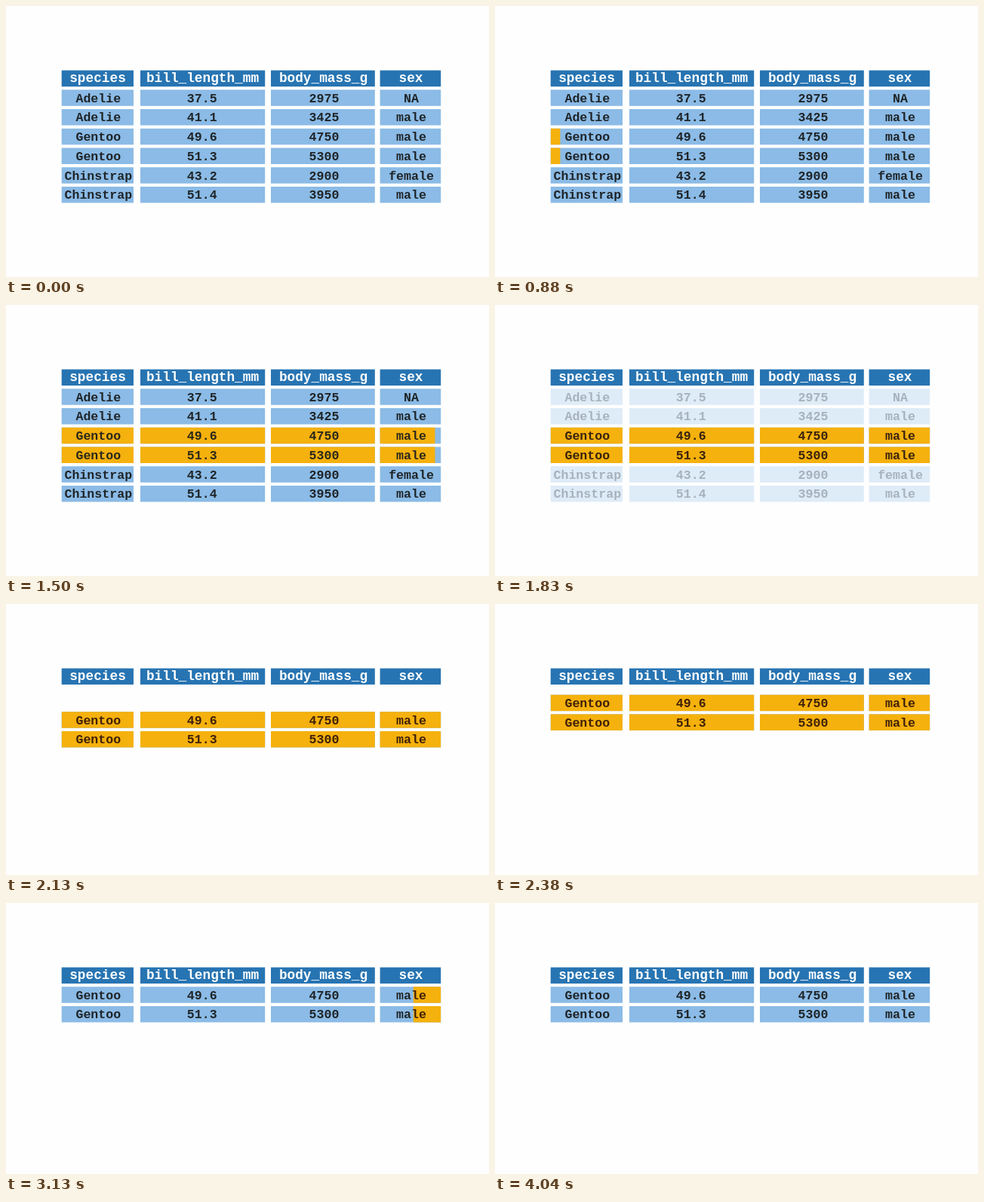
Write an HTML page with a canvas that moves like this. It is 640x360 px and loops after 5.04 s.

```html
<!DOCTYPE html>
<html lang="en">
<head>
<meta charset="utf-8">
<title>Filtering table rows</title>
<style>
html, body { margin: 0; width: 100%; height: 100%; overflow: hidden; background: #fefefe; }
canvas { display: block; width: 640px; height: 360px; }
</style>
</head>
<body>
<canvas id="stage" width="640" height="360"></canvas>
<script>
const ctx = document.getElementById('stage').getContext('2d');
const LOOP = 5040;
const FPS = 24;
const TOP = 85.5, PITCH = 25.75, ROW_H = 21.5;
const LEFT = 73.5, RIGHT = 576.5;
const FONT = '"Liberation Mono", "Noto Sans Mono", monospace';

const columns = [
  { name: 'species', x: 73.7, w: 95.3, head: 121.5, mid: 122.3 },
  { name: 'bill_length_mm', x: 178, w: 165.2, head: 260.5, mid: 259.7 },
  { name: 'body_mass_g', x: 351, w: 137.8, head: 420.5, mid: 421.5 },
  { name: 'sex', x: 495.6, w: 80.6, head: 536.5, mid: 537 }
];
const rows = [
  ['Adelie', '37.5', '2975', 'NA'],
  ['Adelie', '41.1', '3425', 'male'],
  ['Gentoo', '49.6', '4750', 'male'],
  ['Gentoo', '51.3', '5300', 'male'],
  ['Chinstrap', '43.2', '2900', 'female'],
  ['Chinstrap', '51.4', '3950', 'male']
];
const isKept = row => row[0] === 'Gentoo';

const blue = { fill: '#8bbbe6', text: '#1f2427' };

// Linear progress between two moments counted in ticks.
const ramp = (tick, from, to) => Math.min(1, Math.max(0, (tick - from) / (to - from)));
const mix = (a, b, p) => a.map((v, i) => Math.round(v + (b[i] - v) * p));

function drawRow(cells, y, style) {
  for (const [i, col] of columns.entries()) {
    ctx.fillStyle = style.fill;
    ctx.fillRect(col.x, y, col.w, ROW_H);
    ctx.fillStyle = style.text;
    ctx.fillText(cells[i], col.mid, y + 16.4);
  }
}

function drawHeader() {
  ctx.font = `bold 17.75px ${FONT}`;
  for (const col of columns) {
    ctx.fillStyle = '#2774b2';
    ctx.fillRect(col.x, TOP, col.w, ROW_H);
    ctx.fillStyle = '#fff';
    ctx.fillText(col.name, col.head, TOP + 15.9);
  }
}

function draw(tick) {
  const sweepIn = ramp(tick, 20.6, 36.25);
  const fade = ramp(tick, 39, 46);
  const rise = ramp(tick, 45.8, 59.5);
  const sweepOut = ramp(tick, 62.3, 76);
  const edge = p => LEFT + (RIGHT - LEFT) * p;
  const yellow = {
    fill: '#f5b10d',
    text: `rgb(${mix([43, 39, 28], [64, 33, 8], fade)})`
  };

  ctx.fillStyle = '#fefefe';
  ctx.fillRect(0, 0, 640, 360);
  ctx.textAlign = 'center';
  drawHeader();

  ctx.font = `bold 16.6px ${FONT}`;
  rows.forEach((row, i) => {
    const y = TOP + PITCH * (i + 1);
    if (!isKept(row)) {
      ctx.globalAlpha = 1 - fade;
      drawRow(row, y, blue);
      ctx.globalAlpha = 1;
      return;
    }
    const top = y - 2 * PITCH * rise;
    drawRow(row, top, blue);
    const start = edge(sweepOut), end = edge(sweepIn);
    if (end <= start) return;
    ctx.save();
    ctx.beginPath();
    ctx.rect(start, top - 1, end - start, ROW_H + 2);
    ctx.clip();
    drawRow(row, top, yellow);
    ctx.restore();
  });
}

const began = performance.now();
function frame() {
  const t = (performance.now() - began) % LOOP;
  draw(Math.floor((t + 5) * FPS / 1000));
  requestAnimationFrame(frame);
}
frame();
</script>
</body>
</html>
```
